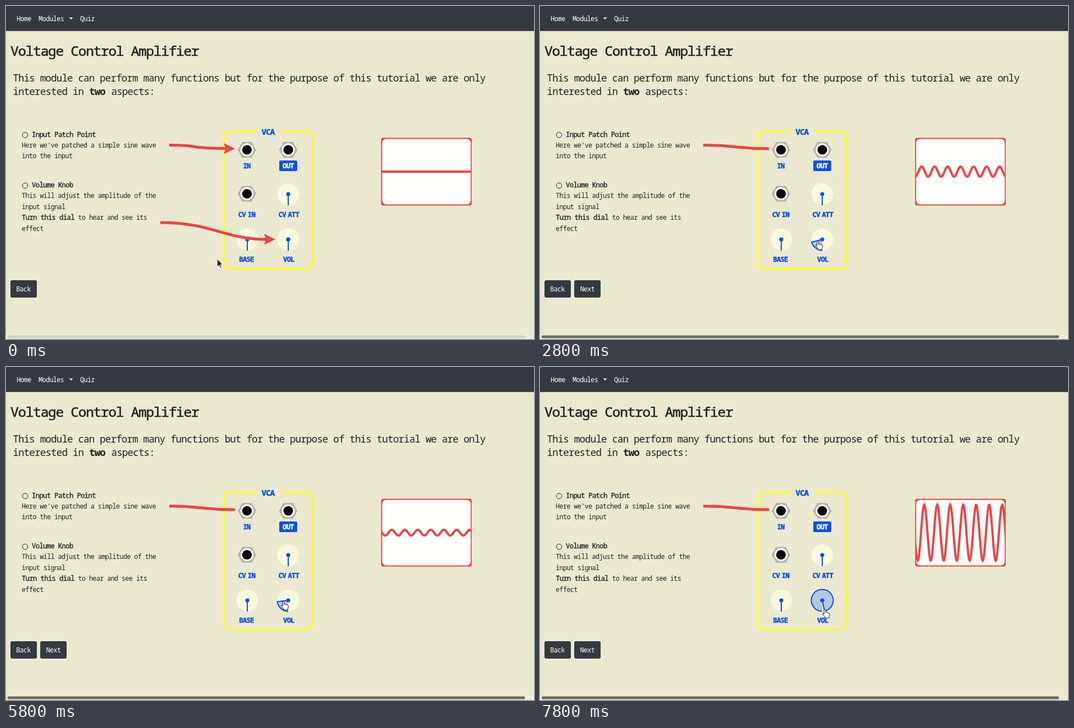
Write an HTML page that moves like this. It is 941 px wide and 595 px high and loops after 8 s.

```html
<!DOCTYPE html>
<html lang="en">
<head>
<meta charset="utf-8">
<title>Voltage Control Amplifier</title>
<style>
  html, body { margin: 0; width: 100%; height: 100%; overflow: hidden; background: #ebe8d0; }
  svg { display: block; }
  text { font: 11.75px "Noto Sans Mono", monospace; letter-spacing: -.05em; fill: #212529; }
  .strong { font-size: 12.2px; stroke: #212529; stroke-width: .35; }
  .title { font-size: 24.4px; stroke: #212529; stroke-width: .6; }
  .lead { font-size: 17.6px; }
  .label { font-size: 12px; font-weight: 700; fill: #0a50ee; stroke: #0a50ee; stroke-width: .5; text-anchor: middle; word-spacing: -3px; }
  .light { fill: #fff; }
  .label.light { stroke: #fff; }
  .dark { fill: #343a40; }
  .blue { fill: #0a50ee; }
  .cable { fill: none; stroke: #ee4444; stroke-width: 5; }
  .red { fill: #ee4444; }
</style>
</head>
<body>
<svg width="941" height="595" viewBox="0 0 941 595">
  <defs>
    <g id="jack">
      <path d="M-16.5 0L-8.5-14H8.5L16.5 0L8.5 14H-8.5Z" fill="#b4b3ab"/>
      <circle r="11.7" fill="#fff"/>
      <circle r="8.6"/>
    </g>
    <circle id="dial" r="19.3" fill="#fbf8e0"/>
    <g id="pointer">
      <path d="M0 0V20" stroke="#0a50ee" stroke-width="2"/>
      <circle r="3.6" class="blue"/>
    </g>
    <clipPath id="screen"><rect x="669" y="237" width="160" height="118" rx="5"/></clipPath>
  </defs>

  <rect width="941" height="595" fill="#ebe8d0"/>
  <rect width="941" height="44.7" class="dark"/>
  <text x="19" y="27" class="light">Home</text>
  <text x="58" y="27" class="light">Modules</text>
  <path d="M112.5 20.5H119.5L116 24Z" fill="#fff"/>
  <text x="132" y="27" class="light">Quiz</text>

  <text x="8" y="88.5" class="title">Voltage Control Amplifier</text>
  <text x="12.3" y="135" class="lead">This module can perform many functions but for the purpose of this tutorial we are only</text>
  <text x="12.3" y="158.5" class="lead">interested in <tspan x="148" font-weight="700">two</tspan><tspan x="187.5">aspects:</tspan></text>

  <g fill="none" stroke="#212529"><circle cx="34" cy="230.5" r="4.8"/><circle cx="34" cy="321" r="4.8"/></g>
  <text x="46" y="234" class="strong">Input Patch Point</text>
  <text x="28" y="253">Here we've patched a simple sine wave</text>
  <text x="28" y="272">into the input</text>
  <text x="46" y="324" class="strong">Volume Knob</text>
  <text x="28" y="343">This will adjust the amplitude of the</text>
  <text x="28" y="362.5">input signal</text>
  <text x="28" y="382" class="strong">Turn this dial</text>
  <text x="128.5" y="382">to hear and see its</text>
  <text x="28" y="401.5">effect</text>

  <rect x="388" y="224" width="158.7" height="245.5" rx="11" fill="none" stroke="#ffff12" stroke-width="3"/>
  <rect x="447.5" y="220" width="42" height="8" fill="#ebe8d0"/>
  <text x="467" y="230" class="label" style="font-size:14px">VCA</text>
  <use href="#jack" x="429.5" y="257"/>
  <use href="#jack" x="503" y="257"/>
  <use href="#jack" x="429.5" y="335.5"/>
  <rect x="487" y="276" width="32" height="19" rx="2.5" class="blue"/>
  <text x="429" y="290" class="label">IN</text>
  <text x="503" y="290" class="label light">OUT</text>
  <text x="429" y="377" class="label">CV IN</text>
  <text x="504" y="377" class="label">CV ATT</text>
  <text x="428.5" y="457" class="label">BASE</text>
  <text x="504" y="457" class="label">VOL</text>
  <use href="#dial" x="503" y="336"/><use href="#pointer" x="503" y="336"/>
  <use href="#dial" x="430" y="417"/><use href="#pointer" x="430" y="417"/>
  <g transform="translate(503 417)">
    <use href="#dial"/>
    <path id="sector" fill="#0a50ee" fill-opacity=".3" stroke="#0a50ee" stroke-width="2"/>
    <use href="#pointer" id="rest"/>
    <circle r="3.6" class="blue"/>
  </g>

  <rect x="668.5" y="235.5" width="161.5" height="121" rx="4" class="red"/>
  <rect x="670.5" y="237.5" width="157.8" height="117" rx="7" fill="#fffffb"/>
  <path id="wave" class="cable" style="stroke-width:4" clip-path="url(#screen)"/>

  <g id="hints">
    <path class="cable" d="M291 248.5C352 248.5 318 254.5 392 254.5M275 387C368 387 390 417 464 417"/>
    <path class="red" d="M388 245L408 255L388 264.5L391.5 255ZM460 407L480 417L460 426.5L463.5 417Z"/>
  </g>
  <path id="plug" class="cable" d="M291 248.5C349 248.5 349 255 408 255"/>

  <rect x="8" y="490" width="47" height="31" rx="3" class="dark"/>
  <text x="18" y="510" class="light">Back</text>
  <g id="next">
    <rect x="61" y="490" width="47" height="31" rx="3" class="dark"/>
    <text x="71.5" y="510" class="light">Next</text>
  </g>
  <rect y="587" width="941" height="8" fill="#eeebd9"/>
  <rect id="scrollbar" x="2.5" y="588.5" width="922.5" height="5" rx="2.5"/>

  <path id="arrow" d="M0 0V14L3.2 11L5.4 16L7.6 15L5.4 10.2H9.5Z" fill="#222" stroke="#fff" stroke-width=".8"/>
  <path id="hand" d="M-2 1Q-2-.5-.7-.5T.7 1V5Q2.5 4 3.2 5.6Q5 4.8 5.6 6.4Q8 6 8 8V10Q8 12 6.8 13V15H-.5V13Q-2.5 11-4.5 8Q-4.5 6.5-3.5 6.5T-2 8Z" fill="#fff" stroke="#222" stroke-linejoin="round"/>
</svg>
<script>
const $ = id => document.getElementById(id);
const LOOP = 8000, STEP = 100, HAND = 1200, ARRIVE = 1300, TURN = 1700;
const PERIOD = 23.15, CYCLES_PER_SECOND = 4.44, LAG = 200, GAIN = .147;
const KNOB = { x: 503, y: 417, r: 19.5 };

// Dial positions: time in ms, degrees clockwise from the bottom
const turns = [[TURN, 0], [2800, 75], [3500, 168], [4000, 168], [5600, 35], [5800, 84], [6800, 305], [7800, 348]];

function sample(keys, t) {
  const i = keys.findIndex(k => k[0] >= t);
  if (i < 0) return keys.at(-1).slice(1);
  if (i === 0) return keys[0].slice(1);
  const a = keys[i - 1], b = keys[i], p = (t - a[0]) / (b[0] - a[0]);
  return a.slice(1).map((v, n) => v + (b[n + 1] - v) * p);
}

const dialAngle = t => sample(turns, t)[0];

// The hand circles the knob, drifting outwards as the dial opens.
function grip(degrees) {
  const a = degrees * Math.PI / 180, r = 8 + 8 * degrees / 360;
  return [KNOB.x + 2 - r * Math.sin(a), KNOB.y + 1 + r * Math.cos(a)];
}

const approach = [[500, 376.5, 452], [700, 461, 477], [800, 461, 477], [ARRIVE, ...grip(0)]];
const cursorAt = t => t < ARRIVE ? sample(approach, t) : grip(dialAngle(t));

function wavePath(t) {
  const amplitude = GAIN * dialAngle(t - LAG);
  const phase = .44 + CYCLES_PER_SECOND * (t - 2800) / 1000;
  let d = "";
  for (let x = 668; x <= 831; x++) {
    const y = 296 - amplitude * Math.cos(2 * Math.PI * ((x - 670) / PERIOD - phase));
    d += `${d ? "L" : "M"}${x} ${y.toFixed(2)}`;
  }
  return d;
}

function sectorPath(degrees) {
  const a = degrees * Math.PI / 180, { r } = KNOB;
  return `M0 0L${-r * Math.sin(a)} ${r * Math.cos(a)}A${r} ${r} 0 ${+(degrees > 180)} 0 0 ${r}`;
}

const show = (id, visible) => $(id).style.display = visible ? "" : "none";

function draw(t) {
  const turned = t >= TURN, angle = dialAngle(t);
  show("hints", !turned);
  show("plug", turned);
  show("next", turned);
  show("rest", angle === 0);
  show("sector", angle > 0);
  $("scrollbar").setAttribute("fill", turned ? "#6f6d64" : "#d3d1c3");
  $("sector").setAttribute("d", sectorPath(angle));
  $("wave").setAttribute("d", wavePath(t));

  const [x, y] = cursorAt(t);
  show("arrow", t < HAND);
  show("hand", t >= HAND);
  for (const id of ["arrow", "hand"]) $(id).setAttribute("transform", `translate(${x} ${y})`);
}

const begin = performance.now();
function tick() {
  const t = (performance.now() - begin) % LOOP;
  draw(Math.floor(t / STEP) * STEP);
  requestAnimationFrame(tick);
}
tick();
</script>
</body>
</html>
```
